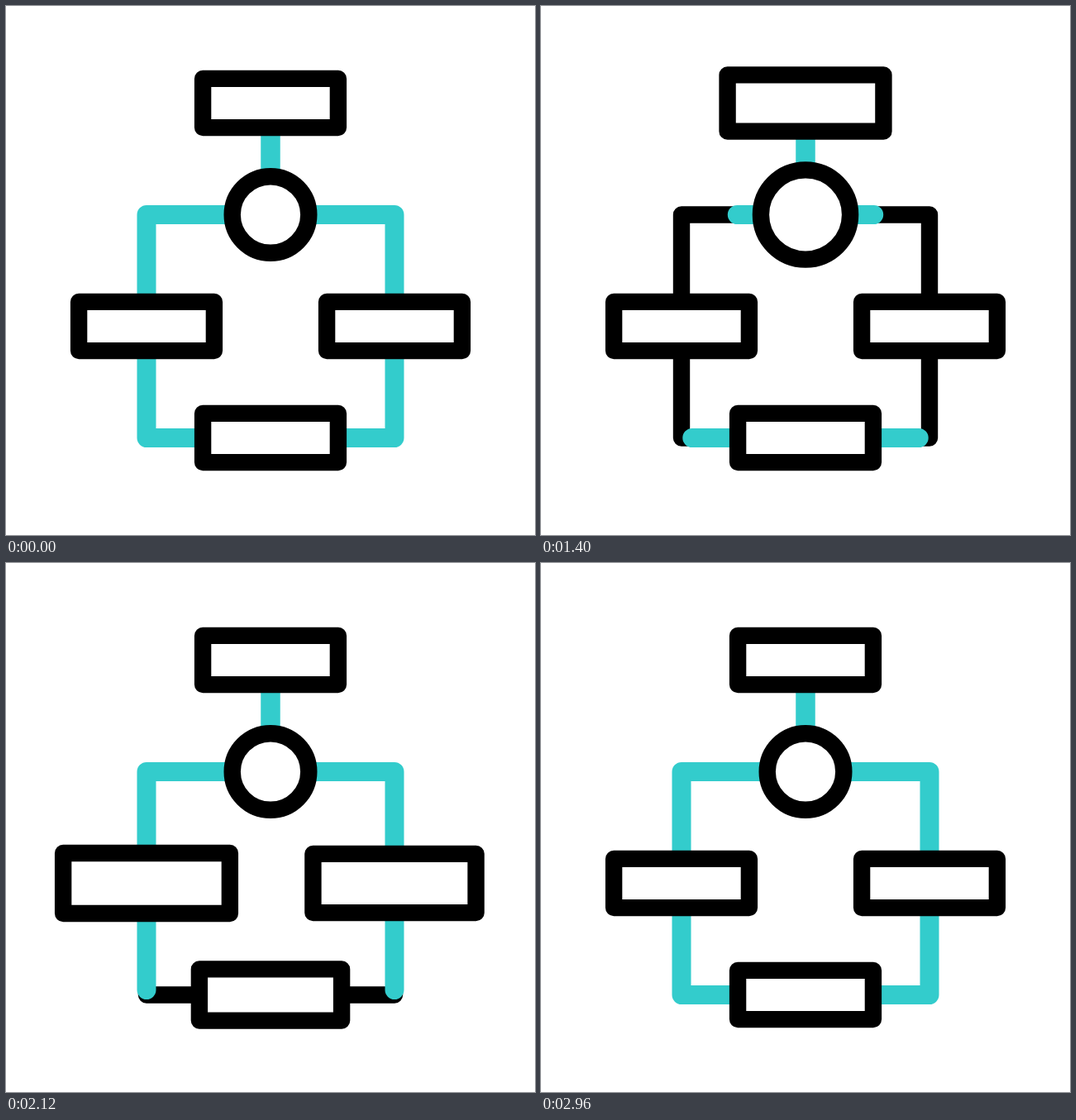
Animation, 640 px wide and 640 px high, one loop 3000 ms. Source, as an HTML page with a canvas:

```html
<!DOCTYPE html>
<html lang="en">
<head>
<meta charset="utf-8">
<title>Flow chart</title>
<style>
  html, body { margin: 0; width: 100%; height: 100%; overflow: hidden; background: #fff; }
  canvas { display: block; width: 100vw; height: 100vh; object-fit: contain; }
</style>
</head>
<body>
<canvas id="stage" width="640" height="640"></canvas>
<script>
const ctx = document.getElementById('stage').getContext('2d');
const LOOP = 3000, STEP = 40;
const BLACK = '#000', TEAL = '#33cccc';
const LINE = 20.4, TEAL_LINE = 23;
const PATH_LENGTH = 640;

// Each node swells from `start`, rests, and shrinks from `fall` on.
const circle = { x: 320, y: 252.5, start: 1090, fall: 1572, grow: 0.193 };
const boxes = [
  { x: 320, y: 117.5, start: 690, fall: 1172, grow: 0.283 },
  { x: 170, y: 387.5, start: 1626, fall: 2108, grow: 0.232 },
  { x: 470, y: 387.5, start: 1626, fall: 2108, grow: 0.204 },
  { x: 320, y: 522.5, start: 1956, fall: 2490, grow: 0.14 }
];

function ease(time, start, duration) {
  const p = Math.min(1, Math.max(0, (time - start) / duration));
  return p * p * (3 - 2 * p);
}

function nodeScale(node, time) {
  return 1 + node.grow * (ease(time, node.start, 400) - ease(time, node.fall, 482));
}

// side is -1 for the left branch and 1 for the right one
function branch(side) {
  const path = new Path2D();
  path.moveTo(320, 117.5);
  path.lineTo(320, 252.5);
  path.lineTo(320 + side * 150, 252.5);
  path.lineTo(320 + side * 150, 522.5);
  path.lineTo(320 + side * 65, 522.5);
  return path;
}
const branches = [branch(-1), branch(1)];

function strokeBranches(color, width, dash) {
  ctx.strokeStyle = color;
  ctx.lineWidth = width;
  ctx.setLineDash(dash);
  branches.forEach(path => ctx.stroke(path));
  ctx.setLineDash([]);
}

function paintNode(path) {
  ctx.fillStyle = '#fff';
  ctx.strokeStyle = BLACK;
  ctx.lineWidth = LINE;
  ctx.fill(path);
  ctx.stroke(path);
}

function drawCircle(time) {
  const path = new Path2D();
  path.arc(circle.x, circle.y, 46.3 * nodeScale(circle, time), 0, Math.PI * 2);
  paintNode(path);
}

function drawBox(box, time) {
  const scale = nodeScale(box, time);
  const w = 163.8 * scale, h = 59.2 * scale;
  const path = new Path2D();
  path.rect(box.x - w / 2, box.y - h / 2, w, h);
  paintNode(path);
}

function draw(time) {
  ctx.fillStyle = '#fff';
  ctx.fillRect(0, 0, 640, 640);
  ctx.lineCap = ctx.lineJoin = 'round';

  const erased = PATH_LENGTH * ease(time, 0, 1770);
  const redrawn = PATH_LENGTH * ease(time, 640, 1940);
  strokeBranches(BLACK, LINE, []);
  strokeBranches(TEAL, TEAL_LINE,
    [redrawn, erased - redrawn, PATH_LENGTH - erased + 1, 0]);

  drawCircle(time);
  boxes.forEach(box => drawBox(box, time));
}

const begin = performance.now();
function tick() {
  const time = (performance.now() - begin) % LOOP;
  draw(Math.floor(time / STEP) * STEP);
  requestAnimationFrame(tick);
}
tick();
</script>
</body>
</html>
```
